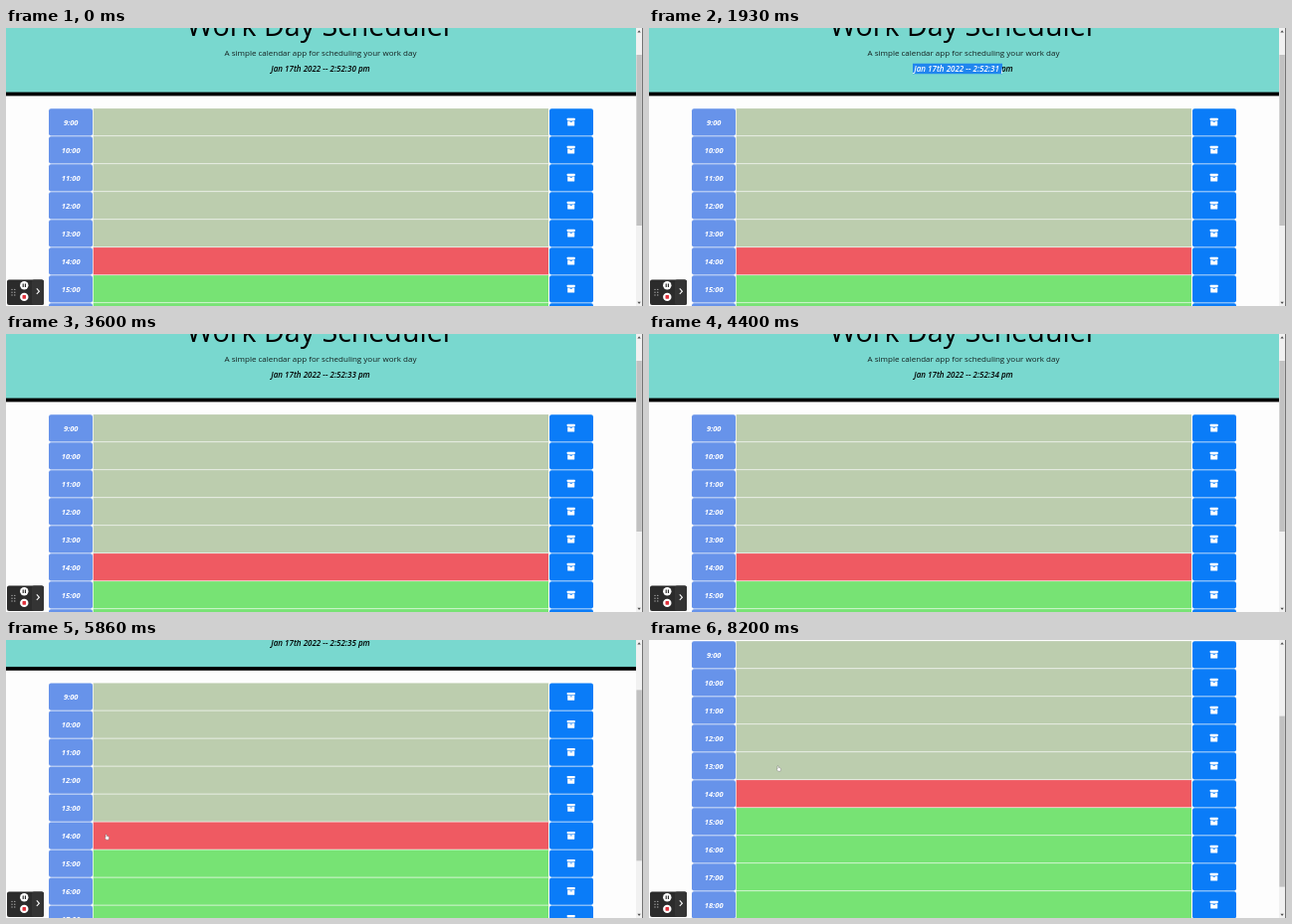
Animation of 640x280 px, one loop 8.73 s. Source, as an HTML page:

```html
<!DOCTYPE html>
<html lang="en">
<head>
<meta charset="utf-8">
<title>Work Day Scheduler</title>
<style>
  html, body { margin: 0; width: 100%; height: 100%; overflow: hidden; background: #fdfdfd; }
  svg { display: block; width: 640px; height: 280px; font-family: "Open Sans", sans-serif; }
  .mid { text-anchor: middle; }
  .date { font-size: 8px; font-weight: 600; font-style: italic; }
  .hour { font-size: 7.5px; font-weight: 700; font-style: italic; fill: #fff; }
</style>
</head>
<body>
<svg viewBox="0 0 640 280">
  <defs>
    <clipPath id="picked"><rect id="pickedBox" x="265" y="35.5" width="0" height="11"/></clipPath>
    <g id="archive" fill="#fff">
      <rect x="-4" y="-4" width="8" height="2.3" rx=".5"/>
      <path d="M-3.5-1.2H3.5V3.2Q3.5 3.7 3 3.7H-3Q-3.5 3.7-3.5 3.2Z"/>
      <rect x="-1.3" y="-.5" width="2.6" height=".8" rx=".4" fill="#0a7cf8"/>
    </g>
  </defs>
  <rect width="640" height="280" fill="#fdfdfd"/>
  <g id="page">
    <rect y="-40" width="633" height="105" fill="#79d8cf"/>
    <rect y="64.6" width="633" height="3.8" fill="#000"/>
    <text class="mid" x="316" y="8" font-size="28.6">Work Day Scheduler</text>
    <text class="mid" x="316" y="27.8" font-size="8" fill="#14201f">A simple calendar app for scheduling your work day</text>
    <text class="mid date clock" x="316" y="44"></text>
    <g clip-path="url(#picked)">
      <rect x="265" y="35.5" width="110" height="11" fill="#2086ee"/>
      <text class="mid date clock" x="316" y="44" fill="#fff"></text>
    </g>
    <g id="rows"></g>
  </g>

  <rect x="633" width="7" height="280" fill="#f1f1f1"/>
  <rect id="thumb" x="633.4" y="27" width="5.4" height="172" fill="#c1c1c1"/>
  <path d="M634.4 4.4L636.1 2.2L637.8 4.4ZM634.4 275.8L636.1 278L637.8 275.8Z" fill="#505050"/>
  <rect x="639.2" width=".8" height="280" fill="#555"/>

  <g id="recorder">
    <rect x="1" y="253.5" width="37" height="25.5" rx="2" fill="#2b2b2b"/>
    <rect x="26" y="253.5" width="12" height="25.5" rx="2" fill="#343434"/>
    <g id="grip" fill="#aaa"></g>
    <circle cx="18.3" cy="259.2" r="4.2" fill="#fff"/>
    <path d="M17.2 257.4V261M19.4 257.4V261" stroke="#222" stroke-width="1.1"/>
    <circle cx="18.3" cy="270.9" r="4.2" fill="#fff"/>
    <rect x="16.5" y="269.1" width="3.6" height="3.6" rx=".6" fill="#e0323c"/>
    <path d="M30.8 262.4L33.4 265.2L30.8 268" fill="none" stroke="#fff" stroke-width="1.1"/>
  </g>

  <path id="hand" d="M-1.5-2.6Q-.9-3.2-.4-2.4L-.1-.9L1.6-.4Q2.2-.1 2.1.7L1.6 2.7H-.9L-2.2.7Q-2.2 0-1.4.3Z"
        fill="#fff" stroke="#555" stroke-width=".35"/>
</svg>
<script>
const LOOP = 8730;
const $ = id => document.getElementById(id);

const slotColor = hour => hour < 14 ? '#bccdae' : hour === 14 ? '#ef5a62' : '#77e374';

function row(hour) {
  const y = 81.2 + (hour - 9) * 28;
  return `<rect x="43" y="${y}" width="44" height="27.2" rx="2.2" fill="#6793ea"/>
    <rect x="87.7" y="${y - .1}" width="457.3" height="27.3" fill="${slotColor(hour)}"/>
    <rect x="546" y="${y}" width="44" height="27.2" rx="2.2" fill="#0a7cf8"/>
    <text class="mid hour" x="65.2" y="${y + 16.7}">${hour}:00</text>
    <use href="#archive" x="567.7" y="${y + 13.5}"/>`;
}

let rows = '';
for (let hour = 9; hour <= 18; hour++) rows += row(hour);
$('rows').innerHTML = rows;

let dots = '';
for (let i = 0; i < 6; i++)
  dots += `<circle cx="${6 + i % 2 * 2.8}" cy="${263.4 + (i >> 1) * 2.8}" r=".7"/>`;
$('grip').innerHTML = dots;

const clamp = v => Math.max(0, Math.min(1, v));
const easeOut = v => 1 - (1 - v) ** 2;
const smooth = v => v * v * (3 - 2 * v);

// Interpolates [time, value] keys.
function track(keys, t, ease = smooth) {
  let value = keys[0][1];
  for (let i = 1; i < keys.length; i++) {
    const [t0, a] = keys[i - 1], [t1, b] = keys[i];
    if (t >= t0) value = a + (b - a) * ease(clamp((t - t0) / (t1 - t0)));
  }
  return value;
}

const scrollKeys = [[5770, 0], [5890, 40], [6060, 40], [6210, 80]];
const handX = [[4730, 128], [5350, 101.5], [6200, 101.5], [6330, 99.5], [6800, 99.5], [7460, 128], [8060, 128], [8200, 130.5]];
const handY = [[4730, 150], [5350, 198.5], [6000, 198.5], [6330, 205.5], [6800, 205.5], [7460, 138], [8060, 138], [8200, 129.5]];

function draw(t) {
  const scroll = track(scrollKeys, t, easeOut);
  $('page').setAttribute('transform', `translate(0 ${-scroll})`);
  $('thumb').setAttribute('y', 27 + scroll * .62);

  const time = `Jan 17th 2022 -- 2:52:${30 + Math.floor(t / 1000)} pm`;
  document.querySelectorAll('.clock').forEach(el => {
    if (el.textContent !== time) el.textContent = time;
  });

  // The selection is lost when the clock text is replaced.
  const picked = t < 2000 ? track([[1460, 0], [1900, 90]], t) : 0;
  $('pickedBox').setAttribute('width', picked);

  $('hand').setAttribute('visibility', t < 4730 ? 'hidden' : 'visible');
  $('hand').setAttribute('transform', `translate(${track(handX, t)} ${track(handY, t)})`);
}

const start = performance.now();
function tick() {
  draw((performance.now() - start) % LOOP);
  requestAnimationFrame(tick);
}
tick();
</script>
</body>
</html>
```
